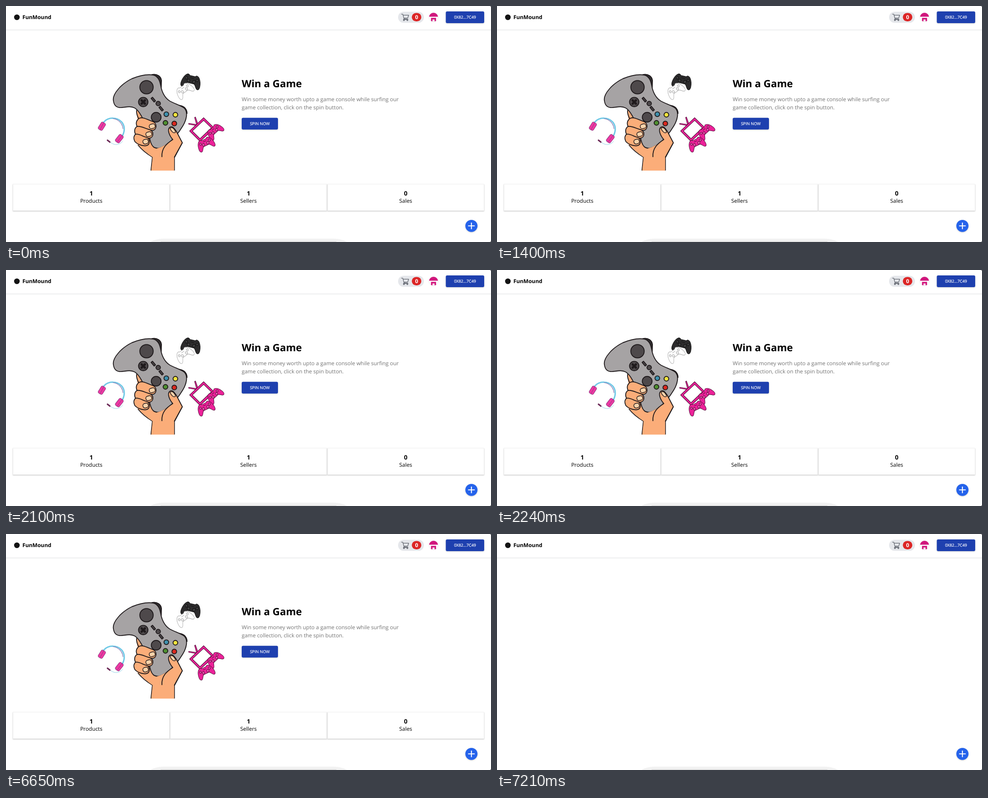
These frames come from a looping animation (1070x523 px, 8000 ms). An HTML page:

```html
<!DOCTYPE html>
<html lang="en">
<head>
<meta charset="utf-8">
<title>Game store</title>
<style>
html, body { margin: 0; width: 100%; height: 100%; overflow: hidden; background: #fff; }
svg { display: block; width: 1070px; height: 523px; }
text { font-family: "Open Sans", "Noto Sans", sans-serif; font-size: 11.89px; text-rendering: geometricPrecision; }
.bold { font-weight: 700; }
.mid { text-anchor: middle; }
.title { font-size: 22.3px; }
.count { font-size: 13.4px; }
.label { font-size: 8.92px; font-weight: 500; fill: #fff; stroke: #fff; stroke-width: .2; }
.grey { fill: #737373; }
.tip text { font-family: Inter, sans-serif; font-size: 8.25px; fill: #fff; }
.btn { fill: #1e40af; filter: drop-shadow(0 1.5px 1.5px rgba(0,0,0,.18)); }
.card { fill: #fff; stroke: #ececec; stroke-width: .6; filter: drop-shadow(0 1px 1.3px rgba(0,0,0,.25)); }
.ink { stroke: #1f1a1c; stroke-width: 1.9; stroke-linejoin: round; stroke-linecap: round; }
.skin { fill: #fbad79; }
.nail { fill: #fdd2a9; stroke-width: 1.5; }
.dark { fill: #4e494b; }
.none { fill: none; }
.page { animation: page 8s step-end infinite; }
.tip { animation: tip 8s step-end infinite; }
@keyframes page {
  0% { visibility: visible; }
  22.75% { visibility: hidden; }
  26.25% { visibility: visible; }
  89.25%, 100% { visibility: hidden; }
}
@keyframes tip {
  0% { visibility: hidden; }
  14% { visibility: visible; }
  17.5% { visibility: hidden; }
  77.875% { visibility: visible; }
  83.125%, 100% { visibility: hidden; }
}
</style>
</head>
<body>
<svg viewBox="0 0 1070 523">
  <defs>
    <path id="pad" d="M-14-9Q-9-13-6-9H6Q9-13 14-9C20-4 24 12 18 14C13 15 11 6 7 5H-7C-11 6-13 15-18 14C-24 12-20-4-14-9Z"/>
    <g id="knobs">
      <circle cx="-6" cy="1" r="2.8"/><circle cx="6" cy="1" r="2.8"/>
      <circle cx="-12" cy="-3" r="2.4"/><circle cx="12" cy="-3" r="2.4"/>
      <path d="M-4-5H4"/>
    </g>
    <clipPath id="face"><circle cx="943.2" cy="25" r="10"/></clipPath>
  </defs>

  <!-- Header -->
  <path d="M0 53.2H1070" stroke="#e3e4e6" stroke-width="1.2"/>
  <circle cx="24" cy="25" r="6.2" fill="#141414"/>
  <text class="bold" x="36.2" y="29.3">FunMound</text>
  <rect x="865" y="12.8" width="57" height="24.4" rx="12.2" fill="#e5e7eb"/>
  <g fill="none" stroke="#5f646d" stroke-width="1.3" stroke-linejoin="round" stroke-linecap="round">
    <path d="M872.4 18.2H875.4L878.3 28.6H886.4M876 20.3H888.4L886.4 26.3L877.8 26.8M878.3 28.6L876.6 30.2H887"/>
    <circle cx="877.9" cy="31.5" r="1.1"/><circle cx="885.5" cy="31.5" r="1.1"/>
  </g>
  <rect x="895.3" y="15.6" width="21" height="18.4" rx="9.2" fill="#dc2626"/>
  <text class="bold mid" x="905.8" y="29.2" fill="#fff">0</text>
  <circle cx="943.2" cy="25" r="10.2" fill="#fff" stroke="#e2e2e2" stroke-width=".7"/>
  <path clip-path="url(#face)" fill="#d1177d" d="M933 15H953.5V23.8H933ZM937.6 26.2H948.8V33.8H945.4V29.8H941V33.8H937.6Z"/>
  <rect class="btn" x="970.3" y="12" width="84.7" height="26" rx="3"/>
  <text class="label mid" x="1012.7" y="28.2">0X82...7C49</text>

  <g class="page">
    <!-- Gripped controller -->
    <g class="ink">
      <path class="skin" stroke="none" d="M319.5 364.6L323 335Q304 322 291 308L284 296L291 260L288 236L340 270L372 277Q380 290 389 303L371.5 336V364.6Z"/>
      <path class="none" stroke-linecap="butt" d="M319.8 364.6L323 335Q303 323 291 308M389 303L371.5 336V364.6"/>
      <path class="skin" d="M297 256C288 244 286 232 290 227.5C298 224 304 236 312 248Z"/>
      <path fill="#302d2f" d="M322 152C333 150 342 155 343 165L342.5 181L330 162ZM378 220C391 220 399 226 399.5 238L392 242Z"/>
      <path fill="#a6a3a4" d="M237 210C234 195 255 172 278 161C295 154 313 151 325 153C337 156 340 168 342.5 182C346 195 352 205 362 211C373 217 387 221 394 227C402 236 398 253 390 266C381 281 371 294 358 304C345 314 333 319 325 312C316 303 318 288 311 272C305 257 297 234 284 226C271 220 261 226 250 225C242 224 238 218 237 210Z"/>
      <g class="dark">
        <circle cx="310" cy="180" r="14.8"/>
        <circle cx="331.3" cy="246.5" r="10.8"/>
        <circle cx="302.8" cy="212.8" r="10.4"/>
        <circle cx="335.8" cy="216.2" r="4.9"/>
        <rect x="-5.2" y="-2" width="10.4" height="4" transform="translate(325 207.5) rotate(50)"/>
        <rect x="-5.2" y="-2" width="10.4" height="4" transform="translate(342.3 227.5) rotate(50)"/>
      </g>
      <path d="M299 209L306.6 216.6M306.6 209L299 216.6" stroke-width="4.6"/>
      <circle cx="353.7" cy="239.8" r="5.2" fill="#3f91ad"/>
      <circle cx="373.7" cy="241" r="5.2" fill="#f2e43d"/>
      <circle cx="351.8" cy="259" r="5.2" fill="#4f9030"/>
      <circle cx="371.3" cy="260.4" r="5.2" fill="#dc291f"/>
      <!-- Palm, fingers and thumb -->
      <path class="skin" stroke="none" d="M296 307L316 304Q322 317 332 316Q349 312 367 296L388 303L371 335V364.6H320.5L323.5 335Q306 324 296 307Z"/>
      <path class="skin" d="M294 249C302 245 312 252 324 256C334 260 333 275 323 275.5C311 276 298 270 290 268C285 261 288 252 294 249Z"/>
      <path class="skin" d="M289 267C298 265 307 272 317 274C327 278 326 292 316 293C304 293 293 288 286 285C282 277 284 270 289 267Z"/>
      <path class="skin" d="M286 284C294 283 302 289 310 291C319 295 318 308 309 309.5C299 311 288 305 284 300C281 293 282 287 286 284Z"/>
      <g class="nail">
        <rect x="-6.5" y="-5" width="13" height="10" rx="4.5" transform="translate(322.5 266.5) rotate(-15)"/>
        <rect x="-6.5" y="-5" width="13" height="10" rx="4.5" transform="translate(315 284) rotate(-15)"/>
        <rect x="-6" y="-5" width="12" height="10" rx="4.5" transform="translate(308 300.5) rotate(-15)"/>
      </g>
      <path class="skin" d="M344 334C343 315 354 305 368 296C361 288 355 275 361 269C367 264 372 272 376 278L389 303L371.5 335"/>
      <path class="nail" d="M362 271C367 266 373 274 374 280C370 283 364 278 362 271Z"/>
    </g>

    <!-- Headset -->
    <g fill="none" stroke-linecap="round">
      <path d="M215 258C226 245 246 246 256 258C263 267 262 279 256 289" stroke="#6fc9e6" stroke-width="3"/>
      <path d="M236 249.5C248 251 257 260 258 272" stroke="#7d6fae" stroke-width="1.2"/>
      <path d="M257 300C249 310 237 309 228 300" stroke="#8fd3e6" stroke-width="1"/>
      <path d="M224 297.5L229 301.5" stroke="#6d2b58" stroke-width="3.4"/>
      <g fill="#ee38a2" stroke="#8b3b82" stroke-width="1">
        <rect x="-5.5" y="-9" width="11" height="18" rx="3.5" transform="translate(211.5 266.5) rotate(32)"/>
        <rect x="-5.5" y="-9.5" width="11" height="19" rx="3.5" transform="translate(250 294) rotate(38)"/>
        <path d="M216 258L207 275M256 287L246 301"/>
      </g>
    </g>

    <!-- Small pads -->
    <g transform="translate(409 165.5) rotate(14) scale(1.02 1.18)" stroke-width="1">
      <use href="#pad" fill="#2c2b2c" stroke="#151515"/>
      <use href="#knobs" fill="#414041" stroke="#111"/>
    </g>
    <g transform="translate(393 186) rotate(-36) scale(.92 1.02)" stroke="#a3a3a3" stroke-width=".9">
      <use href="#pad" fill="#fff"/>
      <use href="#knobs" fill="#f1f1f1"/>
    </g>

    <!-- Television with pads -->
    <g stroke="#59133f" stroke-width="1.1" fill="#ec2199" stroke-linejoin="round">
      <path d="M416 247L418 246L424 263L421 265ZM403 260L423 263V265.5L403 262Z"/>
      <path d="M405 277L436 247.5L460 271L428 300Z"/>
      <path d="M411 277L436 253.5L453 270L428 294Z" fill="#fff"/>
      <g transform="translate(460 277) rotate(-43) scale(.88 .95)">
        <use href="#pad"/><use href="#knobs" fill="#f45bb5"/>
      </g>
      <g transform="translate(440 304.5) rotate(-25) scale(.9 1)">
        <use href="#pad"/><use href="#knobs" fill="#f45bb5"/>
      </g>
    </g>

    <text class="bold title" x="520" y="180.4">Win a Game</text>
    <text class="grey" x="520" y="210.8">Win some money worth upto a game console while surfing our</text>
    <text class="grey" x="520" y="228.7">game collection, click on the spin button.</text>
    <rect class="btn" x="520" y="247.8" width="80" height="26" rx="3"/>
    <text class="label mid" x="560" y="264">SPIN NOW</text>

    <!-- Totals -->
    <rect class="card" x="15.5" y="395" width="345.5" height="58.7"/>
    <rect class="card" x="362.3" y="395" width="345.5" height="58.7"/>
    <rect class="card" x="709.2" y="395" width="345.5" height="58.7"/>
    <g class="mid">
      <text class="bold count" x="188" y="420.2">1</text>
      <text x="188.2" y="436.2">Products</text>
      <text class="bold count" x="535" y="420.2">1</text>
      <text x="535" y="436.2">Sellers</text>
      <text class="bold count" x="881.8" y="420.2">0</text>
      <text x="881.8" y="436.2">Sales</text>
    </g>
  </g>

  <!-- Floating button and window edges -->
  <circle cx="1026.8" cy="487.3" r="13.4" fill="#2563eb" style="filter:drop-shadow(0 1px 1.5px rgba(0,0,0,.2))"/>
  <path d="M1019.5 487.3H1034.1M1026.8 480V494.6" stroke="#fff" stroke-width="2.1"/>
  <path d="M319 523Q330 515.5 348 515.5H722Q740 515.5 752 523Z" fill="#f2f2f2"/>
  <path d="M341 522.3H729" stroke="#dcdcdc" stroke-width="1.4"/>
  <path d="M1068 0H1070V2ZM1070 521V523H1068Z" fill="#555"/>

  <g class="tip">
    <rect x="67" y="-3" width="73.5" height="16.5" fill="#4b4a4b" stroke="#6c6b6c" stroke-width=".8"/>
    <text x="71" y="9.7">Reload this page</text>
  </g>
</svg>
</body>
</html>
```
